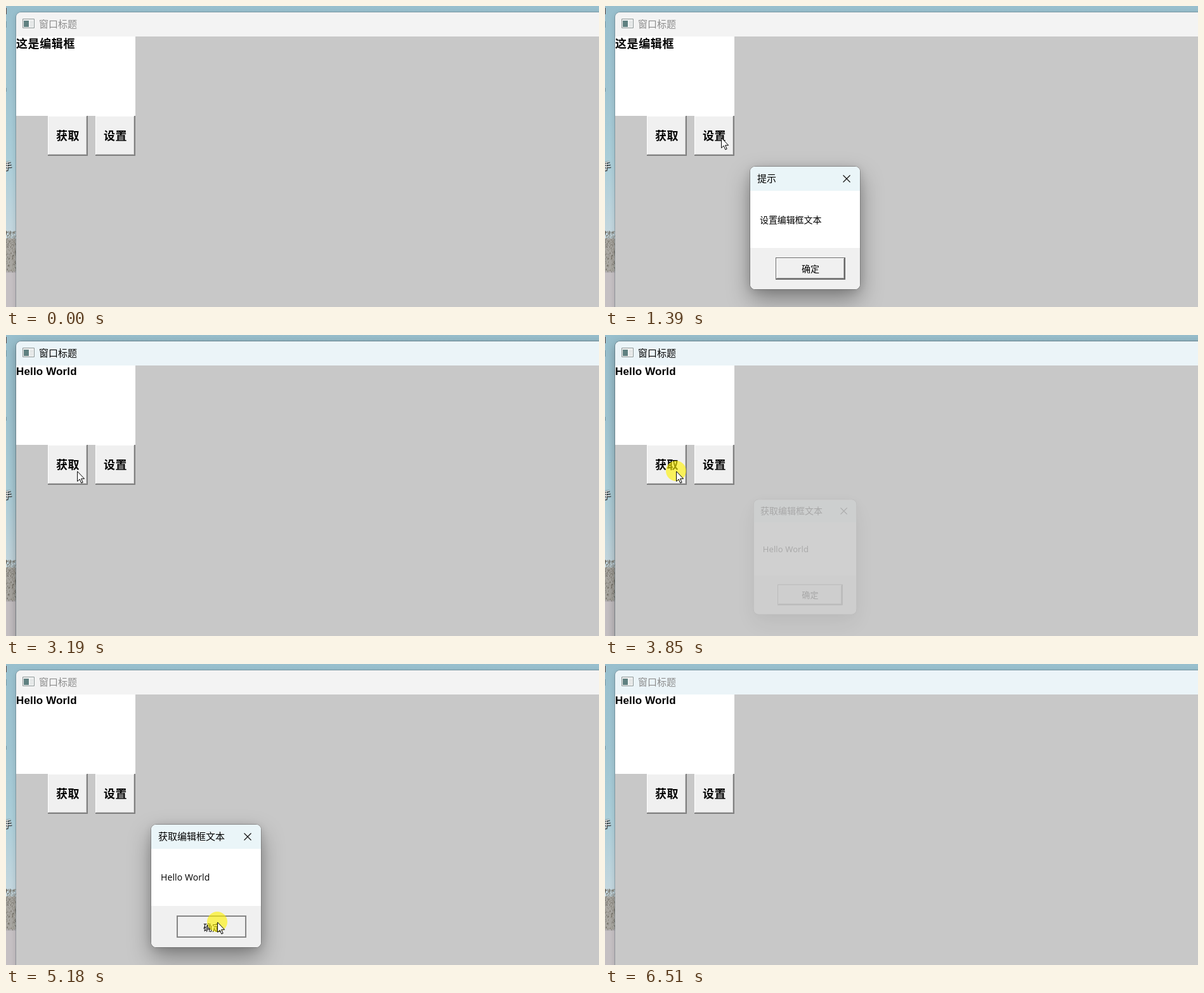
Recreate the animation shown at these times as an HTML page with a canvas. Size 935 px wide and 474 px high, loop 6560 ms.

```html
<!DOCTYPE html>
<html lang="zh-CN">
<head>
<meta charset="utf-8">
<style>
html, body { margin: 0; width: 100%; height: 100%; overflow: hidden; }
body { font-family: "Noto Sans CJK SC", "Noto Sans CJK", sans-serif; color: #000; }
div, span, svg, canvas { position: absolute; box-sizing: border-box; white-space: nowrap; }
#stage { width: 935px; height: 474px; overflow: hidden;
  background: linear-gradient(#98bfcd, #9fc4d1 130px, #aacdd8 240px, #c3d6de 354px); }
#land { left: 0; top: 350px; }
#label { left: -5px; top: 242px; font-size: 14px; line-height: 18px; color: #fff;
  text-shadow: 1px 1px 1px #000, 0 0 2px #222; }
#win { left: 16px; top: 10px; width: 940px; height: 480px; border-radius: 8px 0 0 0;
  background: #c8c8c8; overflow: hidden; }
#shade { left: 16px; top: 10px; width: 940px; height: 480px; border-radius: 8px 0 0 0;
  box-shadow: 0 0 0 1px rgba(70,90,100,.35), 0 2px 9px rgba(0,0,0,.16); }
.active #shade { box-shadow: 0 0 0 1px rgba(60,80,90,.45), 0 4px 16px rgba(0,0,0,.3); }
#bar { width: 100%; height: 38px; background: #f3f3f3; }
.tinted #bar { background: #ebf4f8; }
#caption { left: 36px; top: 7px; font-size: 15px; line-height: 22px; color: #8a8a8a; }
.active #caption { color: #000; }
#edit { left: 0; top: 38px; width: 188px; height: 125px; background: #fff; }
.bold { font-weight: 700; font-size: 18px; line-height: 24px; letter-spacing: .6px; }
.latin { font: 700 17px/20px "Liberation Sans", Arial, sans-serif; letter-spacing: .15px; }
.btn { top: 163px; width: 63px; height: 63px; background: #f0f0f0; border: solid #808080;
  border-width: 0 2px 2px 0; box-shadow: inset 1px 1px #fff, inset -1px -1px #d0d0d0; }
.btn span { left: 13px; top: 18px; }
#dlg { left: 229px; top: 253px; width: 173px; height: 193px; border-radius: 8px;
  box-shadow: 0 0 0 1px rgba(90,90,90,.45), 0 16px 36px rgba(0,0,0,.36), 0 2px 16px rgba(0,0,0,.14); }
#face { width: 100%; height: 100%; border-radius: 8px; overflow: hidden; background: #fff; }
#head { width: 100%; height: 38px; background: #eaf5f8; }
#foot { top: 128px; width: 100%; height: 65px; background: #f0f0f0; }
#title { left: 11px; top: 7px; font-size: 15px; line-height: 22px; }
#msg { left: 15px; top: 73px; font-size: 14px; line-height: 20px; letter-spacing: -.1px; }
#msg.en { font-family: "Open Sans", "Noto Sans", sans-serif; letter-spacing: .1px; }
#ok { left: 40px; top: 143px; width: 110px; height: 35px; font-size: 14px; background: #f0f0f0;
  border: solid #696969; border-width: 1px 2px 2px 1px;
  box-shadow: inset 1px 1px #fff, inset -1px -1px #a0a0a0; }
#ok span { left: 40px; top: 6px; line-height: 20px; }
.down #ok { border: 2px solid #868686; box-shadow: none; }
.down #ok span { left: 40px; top: 6px; }
#spot { width: 32px; height: 32px; margin: -16px; border-radius: 50%; background: rgba(255,242,0,.62); }
</style>
</head>
<body>
<div id="stage">
  <canvas id="land" width="16" height="124"></canvas>
  <span id="label">手</span>
  <svg width="4" height="140"><path d="M0 3h1v10H0z" fill="#5c4a46"/><path d="M0 24h1v10H0zM0 129h1v6H0z" fill="#7898a4"/></svg>
  <div id="shade"></div>
  <div id="win">
    <div id="bar">
      <svg style="left:10px;top:10px" width="20" height="16">
        <path d="M.5.5h18v14H.5z" fill="#f4f5f5" stroke="#8d9696"/>
        <path d="M2 3h8v10H2z" fill="#5f8080"/>
        <path d="M12 4h5M12 6.5h5M12 9h5M12 11.5h5" stroke="#cfd4d4"/>
      </svg>
      <span id="caption">窗口标题</span>
    </div>
    <div id="edit"><span id="text"></span></div>
    <div class="btn" style="left:50px"><span class="bold">获取</span></div>
    <div class="btn" style="left:125px"><span class="bold">设置</span></div>
  </div>
  <div id="dlg"><div id="face">
    <div id="head"><span id="title"></span>
      <svg style="left:146px;top:13px" width="12" height="12"><path d="M.5.5l11 11M11.5.5l-11 11" stroke="#111" stroke-width="1.2"/></svg>
    </div>
    <span id="msg"></span>
    <div id="foot"></div>
    <div id="ok"><span>确定</span></div>
  </div></div>
  <div id="spot"></div>
  <svg id="cursor" width="14" height="22"><path d="M.6.8v15.7l3.6-3.4 2.6 6 2.4-1-2.6-5.8h5z" fill="#fff" stroke="#000"/></svg>
</div>
<script>
const LOOP = 6560, STEP = 66.4, START = 260;
const $ = id => document.getElementById(id);
const clamp = v => Math.max(0, Math.min(1, v));
const within = (t, ...spans) => spans.some(([a, b]) => t >= a && t < b);

// time, x, y of the pointer tip
const path = [
  [260, 426, 348], [400, 290, 285], [520, 150, 235], [590, 102, 224], [660, 104, 222],
  [780, 165, 209], [850, 183, 207], [1390, 183, 207], [1520, 258, 294], [1660, 286, 342],
  [1850, 304, 384], [2180, 314, 403], [2245, 317, 403], [2650, 317, 403], [2780, 255, 335],
  [2920, 160, 245], [3050, 118, 218], [3175, 112, 214], [3900, 112, 214], [3970, 140, 228],
  [4044, 189, 255], [4180, 275, 328], [4290, 320, 366], [4375, 331, 378], [4600, 332, 392],
  [4900, 334, 403], [5040, 335, 404], [5105, 333, 406], [5330, 333, 406], [5450, 385, 420],
  [5580, 485, 446], [5705, 566, 476]
];

function pointer(t) {
  const i = path.findIndex(p => p[0] > t);
  if (i < 1) return path[i ? path.length - 1 : 0].slice(1);
  const [a, x, y] = path[i - 1], [b, u, v] = path[i], k = (t - a) / (b - a);
  return [Math.round(x + (u - x) * k), Math.round(y + (v - y) * k)];
}

// opening and closing times of the message box
const boxes = [
  { from: 1030, to: 2570, title: "提示", msg: "设置编辑框文本" },
  { from: 3830, to: 5225, title: "获取编辑框文本", msg: "Hello World" }
];

function drawDialog(q) {
  const box = boxes.find(b => q >= b.from && q < b.to + 140), s = $("dlg").style;
  s.visibility = box ? "visible" : "hidden";
  if (!box) return;
  const open = 1 - (1 - clamp((q - box.from) / 190)) ** 2;
  const shut = clamp((q - box.to) / 140);
  s.opacity = open * (1 - shut ** 1.5);
  s.transform = `scale(${(.92 + .08 * open) * (1 - .05 * shut)})`;
  $("title").textContent = box.title;
  $("msg").textContent = box.msg;
  $("msg").className = box === boxes[1] ? "en" : "";
}

function draw(t) {
  const q = t < START ? t : START + Math.floor((t - START) / STEP) * STEP;
  const set = t >= 2590, cls = $("stage").classList;
  $("text").textContent = set ? "Hello World" : "这是编辑框";
  $("text").className = set ? "latin" : "bold";
  $("text").style.top = set ? "0" : "-2px";
  cls.toggle("active", within(t, [930, 1060], [2590, 3860], [5240, 6430]));
  cls.toggle("tinted", within(t, [2660, 3920], [5310, LOOP]));
  cls.toggle("down", within(t, [2530, 2760], [5110, 5400]));
  drawDialog(q);
  const [x, y] = pointer(q), move = `translate(${x}px,${y}px)`;
  $("cursor").style.transform = $("spot").style.transform = move;
  $("cursor").style.visibility = within(t, [260, 5710]) ? "visible" : "hidden";
  $("spot").style.visibility = within(t, [930, 1060], [2530, 2590], [3790, 3920], [5110, 5240]) ? "visible" : "hidden";
}

function paintLand() {
  const g = $("land").getContext("2d");
  let seed = 7;
  const rnd = () => (seed = seed * 16807 % 2147483647) / 2147483647;
  g.fillStyle = "#a9a7a2";
  g.fillRect(0, 16, 16, 53);
  g.fillStyle = "#c5c0c3";
  g.fillRect(0, 69, 16, 55);
  g.fillStyle = "#b4b0b2";
  g.fillRect(0, 68, 16, 2);
  for (let i = 0; i < 300; i++) {
    const y = 4 + 64 * rnd() ** 1.4, c = 70 + 90 * rnd() + y * .5;
    g.fillStyle = `rgba(${c},${c - 4},${c - 14},.6)`;
    g.fillRect(Math.floor(rnd() * 16), y, 1, 1 + 2 * rnd());
  }
}

function tick() {
  draw(performance.now() % LOOP);
  requestAnimationFrame(tick);
}
paintLand();
tick();
</script>
</body>
</html>
```
